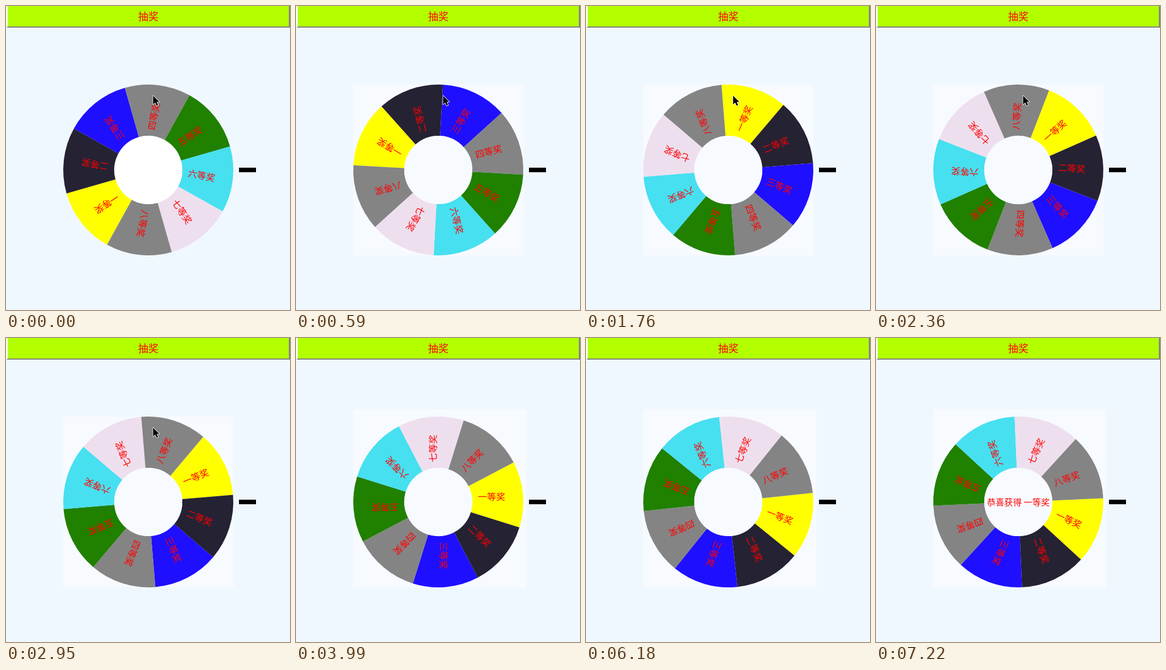
Animation of 501x534 px, one loop 8570 ms. Source, as an HTML page with a canvas:

```html
<!DOCTYPE html>
<html lang="zh">
<head>
<meta charset="utf-8">
<style>
  html, body { margin: 0; width: 100%; height: 100%; overflow: hidden; background: #f0f8ff; }
  canvas { display: block; }
</style>
</head>
<body>
<canvas id="stage" width="501" height="534"></canvas>
<script>
const ctx = document.getElementById('stage').getContext('2d');
const LOOP = 8570, STEP = 147.3, LAST_STEP = 49;
const CX = 251, CY = 288, OUTER = 150, INNER = 60;
const RAD = Math.PI / 180;
const SECTOR = 45 * RAD;
const PRIZES = [
  ['一等奖', '#ffff00'], ['二等奖', '#252233'], ['三等奖', '#1f0fff'], ['四等奖', '#848484'],
  ['五等奖', '#208000'], ['六等奖', '#46e0f0'], ['七等奖', '#eedfee'], ['八等奖', '#848484']
];

function rect(color, x, y, w, h) {
  ctx.fillStyle = color;
  ctx.fillRect(x, y, w, h);
}

function poly(color, points) {
  ctx.fillStyle = color;
  ctx.beginPath();
  points.forEach(([x, y]) => ctx.lineTo(x, y));
  ctx.closePath();
  ctx.fill();
}

// Centres the ideographs' em box on (x, y).
function label(text, x, y, size) {
  ctx.font = `${size}px "Noto Sans CJK SC", "Noto Sans CJK", sans-serif`;
  ctx.textAlign = 'center';
  ctx.fillStyle = '#ff0000';
  ctx.fillText(text, x, y + size * 0.38);
}

function drawButton() {
  rect('#b3ff00', 3, 0, 496, 36);
  poly('#ffffff', [[1, 0], [3, 0], [3, 36], [1, 38]]);
  poly('#808080', [[1, 38], [3, 36], [499, 36], [499, 0], [501, 0], [501, 38]]);
  label('抽奖', 251, 18.5, 18);
}

// The spin slows exponentially, then stops dead.
function wheelAngle(seconds) {
  return Math.min(357.5, 119 + 245 * (1 - Math.exp(-0.515 * seconds))) * RAD;
}

function drawWheel(start, holeColor) {
  ctx.save();
  ctx.translate(CX, CY);
  ctx.rotate(start);
  for (const [name, color] of PRIZES) {
    ctx.fillStyle = color;
    ctx.beginPath();
    ctx.arc(0, 0, OUTER, 0, SECTOR);
    ctx.arc(0, 0, INNER, SECTOR, 0, true);
    ctx.fill();
    ctx.rotate(SECTOR);
  }
  ctx.fillStyle = holeColor;
  ctx.beginPath();
  ctx.arc(0, 0, INNER, 0, 2 * Math.PI);
  ctx.fill();
  ctx.rotate(SECTOR / 2);
  for (const [name] of PRIZES) {
    ctx.save();
    ctx.translate(94.5, -1);
    ctx.rotate(5 * RAD);
    label(name, 0, 0, 16);
    ctx.restore();
    ctx.rotate(SECTOR);
  }
  ctx.restore();
}

function cursorPosition(step) {
  if (step < 23) return [259, 157];
  if (step === 23) return [300, 133];
  return step === 24 ? [393, 126] : null;
}

function drawCursor([x, y]) {
  ctx.save();
  ctx.translate(x + 0.5, y + 0.5);
  const path = new Path2D('M0 0V15.5L3.6 12L6.2 17.6L8.8 16.4L6.3 11H11Z');
  ctx.lineWidth = 1.6;
  ctx.lineJoin = 'round';
  ctx.strokeStyle = '#ffffff';
  ctx.stroke(path);
  ctx.fillStyle = '#000000';
  ctx.fill(path);
  ctx.restore();
}

function draw(time) {
  const step = Math.min(LAST_STEP, Math.floor((time + 12) / STEP));
  const moving = step > 0;
  rect('#f0f8ff', 0, 0, 501, 534);
  drawButton();
  if (moving) {
    const top = step < 23 ? 138 : step === 23 ? 133 : 125;
    rect('#f7faff', 101, top, (step < 24 ? 401 : 406) - 101, 438 - top);
  }
  drawWheel(wheelAngle(step * STEP / 1000), moving ? '#f7faff' : '#ffffff');
  rect('#000000', 411, 284, 30, 8);
  if (step === LAST_STEP) label('恭喜获得 一等奖', CX, CY, 15.3);
  const cursor = cursorPosition(step);
  if (cursor) drawCursor(cursor);
}

function tick() {
  draw(performance.now() % LOOP);
  requestAnimationFrame(tick);
}
tick();
</script>
</body>
</html>
```
